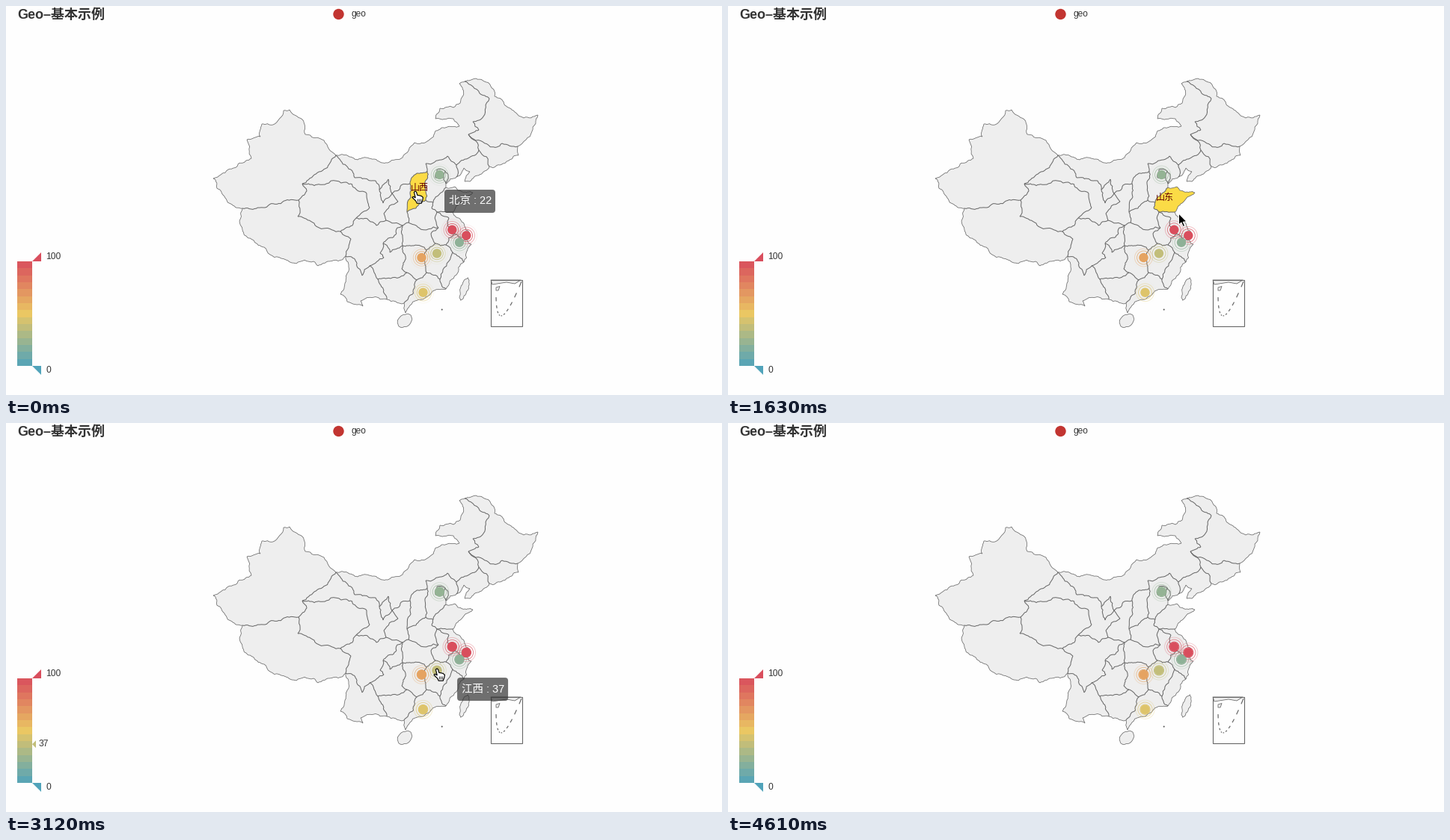
Animation of 957 by 521 pixels, one loop 4710 ms. Source, as a matplotlib script:

```python
import math
import random

import matplotlib.pyplot as plt
import numpy as np
from matplotlib.animation import FuncAnimation
from matplotlib.collections import LineCollection
from matplotlib.colors import to_rgb
from matplotlib.patches import Circle, FancyBboxPatch, Polygon, Rectangle
from matplotlib.path import Path

W, H, DPI = 957, 521, 64
PX = 72 / DPI
LOOP, TICK, STEP, STEPS = 4710, 30, 148.7, 32
PAPER, LAND, LINE, INK = "#fefefe", "#eeeeee", "#666666", "#333333"
SCALE = [np.array(to_rgb(c)) for c in ("#50a3ba", "#eac763", "#d94e5d")]

plt.rcParams["font.family"] = ["Liberation Sans", "Noto Sans CJK JP"]
fig = plt.figure(figsize=(W / DPI, H / DPI), dpi=DPI, facecolor=PAPER)
ax = fig.add_axes([0, 0, 1, 1])
ax.set(xlim=(0, W), ylim=(H, 0))
ax.axis("off")


def path(*v):
    return list(zip(v[::2], v[1::2]))


def shade(value):
    t = min(max(value, 0), 100) / 50
    i = min(int(t), 1)
    return SCALE[i] + (SCALE[i + 1] - SCALE[i]) * (t - i)


def text(x, y, s, size=12, color=INK, **kw):
    kw = {"va": "center", "zorder": 5, **kw}
    return ax.text(x, y, s, fontsize=size * PX, color=color, **kw)


def shape(points, fill, edge="none", lw=0.0, z=2.0):
    return ax.add_patch(Polygon(points, closed=True, fc=fill, ec=edge,
                                lw=lw * PX, zorder=z, joinstyle="round"))


def lines(segments, lw, color=LINE, z=3):
    return ax.add_collection(LineCollection(segments, colors=color,
                                            linewidths=lw * PX, zorder=z))


def rough(a, b):
    """Fractal border from a to b; both neighbours get the same course."""
    lo, hi = sorted((a, b))
    rng = random.Random(f"{lo}{hi}")
    pts = [lo, hi]
    step = math.dist(lo, hi)
    while step > 3.5:
        finer = []
        for p, q in zip(pts, pts[1:]):
            d = rng.uniform(-0.16, 0.16)
            dx, dy = q[0] - p[0], q[1] - p[1]
            finer += [p, (p[0] + dx / 2 - dy * d, p[1] + dy / 2 + dx * d)]
        pts = finer + [hi]
        step /= 2
    return pts if lo == a else pts[::-1]


def sides(points, closed=True):
    ends = points[1:] + points[:1] if closed else points[1:]
    return {tuple(sorted(s)) for s in zip(points, ends)}


def ring(points):
    return [p for a, b in zip(points, points[1:] + points[:1]) for p in rough(a, b)[:-1]]


def island(x, y, long, short, tilt):
    a = np.arange(0, 2 * math.pi, math.pi / 5)
    u, v = long * np.cos(a), short * np.sin(a)
    c, s = math.cos(tilt), math.sin(tilt)
    return list(zip((x + u * c - v * s).tolist(), (y + u * s + v * c).tolist()))


# Key points of the outer line, clockwise from the far west
north = path(277, 231, 297, 219, 328, 204, 322, 179, 340, 175, 342, 158, 357, 159,
             371, 140, 379, 139, 396, 152, 400, 172, 425, 180, 441, 200, 470, 206,
             500, 209, 530, 203, 546, 183, 565, 180, 590, 162, 606, 161, 598, 151,
             574, 151, 580, 137, 598, 136, 611, 120, 606, 104, 613, 101)
east = path(628, 97, 646, 104, 653, 121, 676, 139, 692, 150, 711, 146, 703, 168,
            684, 188, 685, 200, 660, 213, 646, 215, 620, 235, 613, 235, 620, 222,
            612, 217, 602, 229, 588, 238, 588, 243, 600, 242, 610, 249, 624, 250,
            607, 264, 597, 276, 608, 287, 619, 303, 608, 311, 622, 319, 612, 343)
south = path(602, 360, 588, 379, 560, 391, 540, 401, 534, 411, 532, 398, 509, 393,
             474, 395, 477, 402, 456, 396, 447, 386, 456, 358, 454, 335, 432, 342,
             417, 348, 411, 342, 388, 345, 345, 323, 318, 306, 312, 288, 316, 271,
             292, 255)
outline = north + east + south
land = Path(outline)

# Inner borders
west_borders = [
    path(316, 271, 352, 266, 391, 260, 402, 248, 396, 238, 412, 226, 441, 200),
    path(391, 260, 390, 282, 424, 298, 447, 302, 463, 294, 468, 284, 486, 270),
    path(396, 238, 428, 238, 455, 236, 482, 251, 486, 270),
    path(447, 302, 461, 312, 454, 335),
    path(468, 284, 495, 294, 508, 287),
    path(441, 200, 455, 214, 466, 230, 494, 234, 499, 246, 511, 232, 516, 251,
         504, 264, 499, 246),
    path(504, 318, 500, 331, 505, 337, 486, 348, 476, 361, 462, 336, 454, 335),
    path(486, 348, 497, 366, 514, 365, 536, 357),
]
east_borders = [
    path(602, 213, 632, 193, 618, 172, 632, 166, 624, 155, 638, 148, 646, 124,
         633, 117, 613, 101),
    path(618, 172, 640, 184, 656, 189, 663, 184, 684, 188),
    path(632, 193, 646, 215),
    path(540, 238, 528, 240, 516, 251, 524, 262, 505, 278, 508, 287, 530, 294,
         538, 290, 536, 276),
    path(538, 290, 552, 297, 578, 297, 576, 276, 592, 284, 590, 294, 600, 305,
         588, 320, 574, 318),
    path(530, 294, 523, 297, 504, 318, 513, 330, 530, 321),
    path(530, 294, 530, 309, 530, 321),
    path(578, 297, 569, 303, 574, 318, 562, 327),
    path(600, 305, 608, 311),
    path(588, 320, 597, 330, 584, 353, 580, 366, 562, 357),
]
south_borders = [path(597, 330, 612, 343), path(580, 366, 588, 379),
                 path(497, 366, 509, 393), path(549, 367, 532, 398)]

# Areas that light up, with the place of their label
regions = {
    "山西": (553, 244, path(536, 276, 541, 256, 540, 238, 549, 224, 563, 221,
                          560, 238, 561, 260, 548, 271)),
    "河北": (567, 243, path(563, 221, 561, 211, 573, 209, 590, 201, 602, 213, 602, 229,
                          588, 238, 588, 243, 573, 258, 571, 263, 561, 260, 560, 238)),
    "山东": (584, 257, path(588, 243, 600, 242, 610, 249, 624, 250, 607, 264, 597, 276,
                          576, 276, 569, 271, 571, 263, 573, 258)),
    "湖南": (555, 336, path(530, 321, 545, 321, 562, 327, 560, 343, 562, 357, 549, 367,
                          536, 357, 529, 352)),
}
cities = [path(576, 219, 587, 221, 585, 229, 574, 230),
          path(587, 221, 591, 228, 588, 238, 585, 229)]
islands = [island(533, 421.5, 11, 8, -0.7), island(612.5, 379, 16, 4.5, -1.25)]

coast, inner = sides(outline), set()
for part in islands:
    coast |= sides(part)
for part in west_borders + east_borders + south_borders:
    inner |= sides(part, closed=False)
for part in cities + [r[2] for r in regions.values()]:
    inner |= sides(part)

for part in [outline] + islands:
    shape(ring(part), LAND, z=1)
for part in cities:
    shape(ring(part), LAND, z=2.5)
lines([rough(*s) for s in sorted(coast)], 0.75)
lines([rough(*s) for s in sorted(inner - coast)], 1.0)

areas = {name: (shape(ring(points), "#fbdb46"),
                text(x, y, name, color="#640000", ha="center", zorder=4))
         for name, (x, y, points) in regions.items()}

# Island inset: a dashed curve in a box
shape(path(648, 367, 650, 373, 669, 370, 680, 372, 688, 367), LAND, LINE, 0.8)
ax.add_patch(Rectangle((648, 366.5), 42, 62, fc="none", ec=LINE, lw=1.1 * PX, zorder=3))
shape(path(655, 377, 660, 375.5, 658, 381, 655, 381), LAND, LINE, 0.8)


def curve(t):
    a, b, c = np.array([(655, 382), (654, 454), (689, 369)])
    return a * (1 - t) ** 2 + 2 * b * t * (1 - t) + c * t ** 2


lines([[curve(t), curve(t + 0.045)] for t in np.linspace(0.06, 0.955, 10)], 1.2)
ax.add_patch(Circle((582.7, 406.6), 1, fc="#555555", lw=0, zorder=3))

# Title, legend and colour scale
text(15, 12.5, "Geo–基本示例", 18, weight="bold")
ax.add_patch(Circle((444.5, 11), 7.2, fc="#c23531", lw=0))
text(462, 11, "geo")
BANDS, TOP, BOTTOM = 15, 342, 482
band = (BOTTOM - TOP) / BANDS
for i in range(BANDS):
    ax.add_patch(Rectangle((15, BOTTOM - (i + 1) * band), 20, band, lw=0,
                           fc=shade((i + 0.5) * 100 / BANDS), antialiased=False))
for y, tail, value in ((TOP, -12, 100), (BOTTOM, 12, 0)):
    shape(path(35, y, 47, y + tail, 47, y), shade(value))
    text(53, y + tail / 2, str(value))

# Data points and their ripples
spots = {"北京": (579.5, 226, 22), "南京": (596.3, 299.7, 100), "浙江": (606, 316.7, 20),
         "江西": (576, 331.4, 37), "长沙": (555.5, 337, 65), "广东": (557.5, 383.7, 46),
         "上海": (615.3, 307.4, 112)}
PERIOD, RINGS, RADIUS = 4000, 3, 6.2
xs, ys, values = zip(*spots.values())
tints = np.array([shade(v) for v in values])
waves = [ax.scatter(xs, ys, facecolors="none", linewidths=PX, zorder=6)
         for _ in range(RINGS)]
for x, y, c in zip(xs, ys, tints):
    ax.add_patch(Circle((x, y), RADIUS, fc=c, lw=0, zorder=7))

# Hover marker on the scale, tooltip and cursors
mark = shape(path(35, 0, 40, -5, 40, 5), "w", z=4)
mark_label = text(44, 0, "")
tip = ax.add_patch(FancyBboxPatch((0, 0), 68, 31, boxstyle="round,pad=0,rounding_size=4",
                                  fc=(0.196, 0.196, 0.196, 0.7), ec="none", zorder=8))
tip_label = text(0, 0, "", 14.5, "white", zorder=9)

HAND = np.array(path(-1.6, 1.2, 0, 0, 1.5, 1, 2.8, 5.4, 5.8, 5.8, 8.4, 6.6, 10.4, 8.4,
                     9.8, 12, 8.2, 16.2, 2.2, 16.2, 1, 13.4, -4, 8.4, -2.6, 7.2, 0.2, 8.8))
KNUCKLES = [np.array(path(x, 10, x, 13.5)) for x in (3, 5, 7)]
ARROW = np.array(path(0, 0, 0, 15, 3.4, 12, 5.8, 17.5, 8.2, 16.5, 5.8, 11.2, 10.6, 10.8))
hand = shape(HAND, "white", "black", 1.2, 10)
knuckles = lines(KNUCKLES, 0.8, "black", 11)
arrow = shape(ARROW, "black", "white", 1.0, 10)

# Where the cursor goes: step, what it hovers from then on, x, y
stops = [(-1, "北京", 566, 230), (0, "山西", 547, 248), (4, "河北", 574, 230),
         (5, "北京", 580, 228), (9, "河北", 584, 237), (10, "山东", 593, 258),
         (11, "山东", 602.5, 278), (13, "", 607, 292), (15, "上海", 616, 310),
         (19, "浙江", 600, 316), (21, "江西", 576, 329), (23, "湖南", 556, 340),
         (25, "", 577, 356), (26, "", 630, 390), (30, "", 950, 545)]


def cursor(step):
    at, _, px, py = zip(*stops)
    return np.array([np.interp(step, at, px), np.interp(step, at, py)])


def hovered(step):
    return [name for at, name, *_ in stops if at <= max(step, -1)][-1]


def follow():
    """Tooltip state per step: glides after the cursor, lingers one step."""
    states, pos = [], cursor(-1) + (20, 16)
    for step in range(STEPS):
        now, before = hovered(step), hovered(step - 1)
        if now in spots:
            pos = pos + 0.6 * (cursor(step) + (20, 16) - pos)
        states.append((now if now in spots else before, pos))
    return states


notes = follow()


def draw(k):
    step = min(int((k * TICK + 25) / STEP), STEPS - 1)
    target, spot = hovered(step), cursor(step)

    for i, wave in enumerate(waves):
        p = (step * STEP / PERIOD + 0.25 + i / RINGS) % 1
        wave.set_sizes([(2 * (6 + 9 * p) * PX) ** 2])
        wave.set_edgecolors(np.c_[tints, np.full(len(tints), 1 - p)])

    for name, parts in areas.items():
        for part in parts:
            part.set_visible(name == target)

    on_spot = target in spots
    mark.set_visible(on_spot)
    mark_label.set_visible(on_spot)
    if on_spot:
        value = spots[target][2]
        y = BOTTOM - (BOTTOM - TOP) * min(value, 100) / 100
        mark.set_xy(path(35, y, 40, y - 5, 40, y + 5))
        mark.set_facecolor(shade(value))
        mark_label.set_text(str(value))
        mark_label.set_y(y)

    name, (x, y) = notes[step]
    tip.set_visible(name in spots)
    tip_label.set_visible(name in spots)
    if name in spots:
        value = spots[name][2]
        tip.set_bounds(x, y, 71 if value > 99 else 68, 31)
        tip_label.set_text(f"{name} : {value}")
        tip_label.set_position((x + 5.5, y + 15.5))

    pointing = on_spot or land.contains_point(spot)
    hand.set_visible(pointing)
    knuckles.set_visible(pointing)
    arrow.set_visible(not pointing)
    hand.set_xy(HAND + spot)
    knuckles.set_segments([s + spot for s in KNUCKLES])
    arrow.set_xy(ARROW + spot)
    return []


anim = FuncAnimation(fig, draw, frames=LOOP // TICK, interval=TICK, repeat=True,
                     repeat_delay=0, init_func=lambda: draw(0))
plt.show()
```
